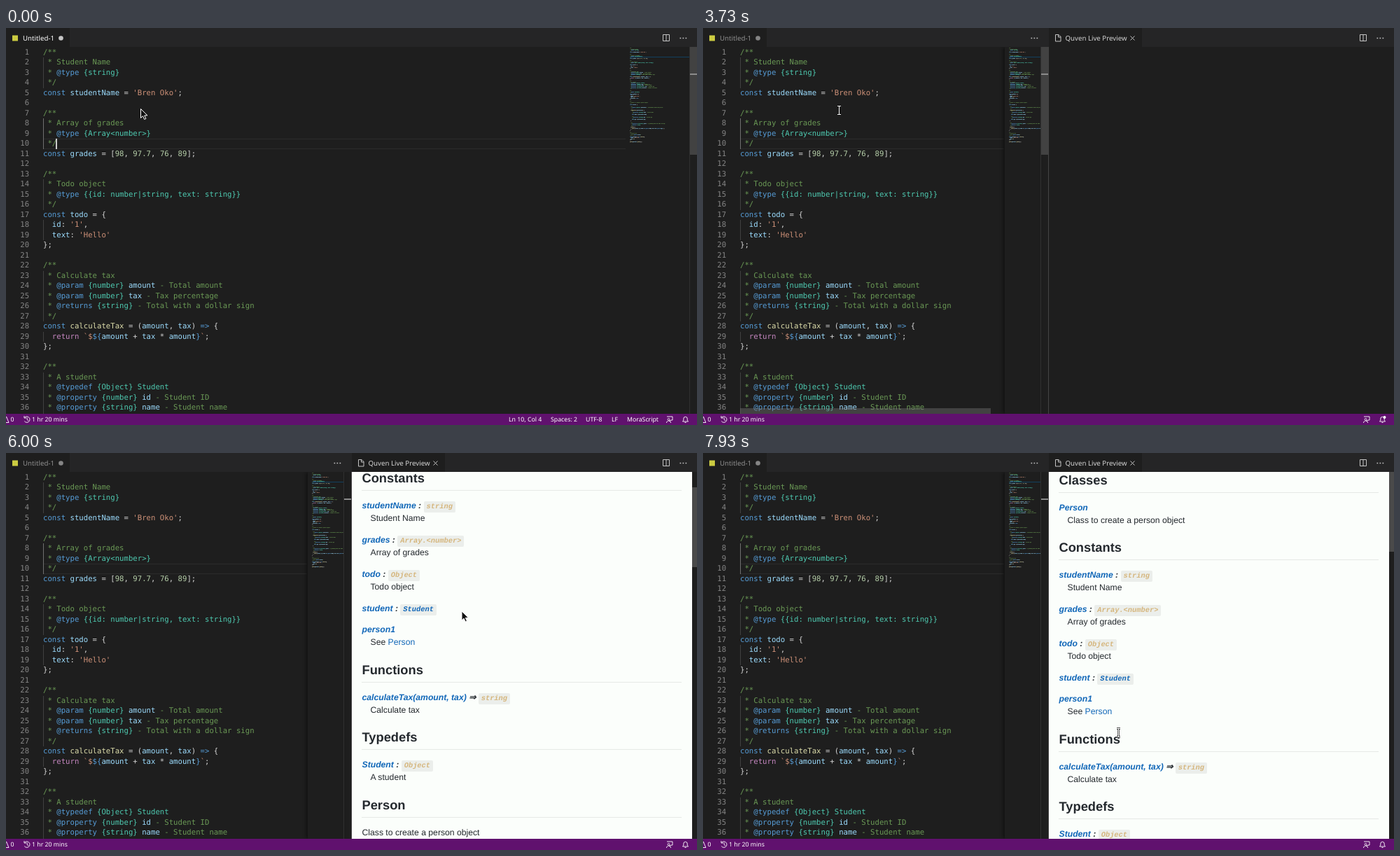
An HTML page that plays this animation: 987 px wide and 567 px high, repeating every 8 s.

```html
<!DOCTYPE html>
<html lang="en">
<head>
<meta charset="utf-8">
<title>Editor with live preview</title>
<style>
html, body { margin: 0; width: 100%; height: 100%; overflow: hidden; background: #1e1e1e; }
body { position: relative; font: 9.68px "Noto Sans", sans-serif; color: #d4d4d4; text-rendering: geometricPrecision; }
body * { position: absolute; }
span, a, b, i, code { position: static !important; }
.t { white-space: pre; line-height: 18px; }
.bar { left: 0; width: 987px; }
#tabs { top: 0; height: 27px; background: #252526; }
.tab { top: 0; height: 27px; background: #1e1e1e; }
.title { color: #fff; }
#status { top: 551px; height: 16px; background: #60116e; color: #fff; font-size: 8.75px; }
#editor { top: 27px; left: 0; width: 987px; height: 524px; overflow: hidden; background: #1e1e1e; }
pre { margin: 0; top: .5px; font: 10.67px/14.5px "DejaVu Sans Mono", monospace; color: #d4d4d4; }
pre div { position: relative; height: 14.5px; }
#code { left: 53px; counter-reset: n; }
#code div::before { counter-increment: n; content: counter(n); position: absolute; right: 100%; margin-right: 19.8px; color: #858585; }
#code .in { box-shadow: inset 1px 0 #404040; }
#code .on { box-shadow: inset 1px 0 #707070; }
#line { left: 53px; top: 131px; width: 832px; height: 13px; border: solid #2c2c2c; border-width: 1px 0; }
#caret { left: 71px; top: 131px; width: 1.5px; height: 15px; background: #ccc; }
#map { left: 885px; top: 0; width: 91px; height: 524px; overflow: hidden; background: #1e1e1e; }
#map pre { left: 6px; transform: scale(.1186, .1052); transform-origin: 0 0; font-weight: bold; -webkit-text-stroke: .8px; }
#map p { margin: 0; left: 6px; top: 14px; width: 90px; height: 1px; background: #12405f; }
#ruler { left: 976px; top: 0; width: 10px; height: 524px; border-left: 1px solid #303030; }
#mark { top: 38px; width: 11px; height: 1.5px; background: #8c8c8c; }
.slider { background: rgba(121, 121, 121, .4); }
#ruler .slider { top: 0; width: 11px; height: 154px; }
#across { left: 53px; top: 516px; width: 358px; height: 8px; }
.split #editor { width: 493px; }
.split #line { width: 377px; }
.split #map { left: 431px; width: 52px; box-shadow: -3px 0 4px -1px #111; }
.split #ruler { left: 482px; }
body:not(.split) .two, .split .one { display: none; }
.split .title { color: #909090; }
#view { left: 493px; top: 27px; width: 494px; height: 524px; overflow: hidden; border-left: 1px solid #444; box-sizing: border-box; background: #1e1e1e; }
#paper { left: 0; top: 0; width: 486px; height: 524px; overflow: hidden; background: #fbfefb; }
#thumb { left: 486px; top: 0; width: 8px; height: 114px; background: #4a4a4a; }
#page { left: -494px; top: -27px; font: 12.19px "Liberation Sans", Arial, sans-serif; color: #24292e; }
#page a { color: #1167b8; }
.h { font-size: 18.29px; font-weight: bold; }
.rule { left: 508px; width: 457px; height: 1px; background: #e6e9e6; }
.d { font-weight: bold; font-style: italic; }
code { font: italic bold 10.36px "Liberation Mono", monospace; padding: 2px 4px; border-radius: 2px; background: #ebeeeb; color: #d5b67d; }
#palette { left: 247px; top: 3px; width: 457px; height: 232px; background: #252526; box-shadow: 0 4px 6px #000; }
#input { left: 3px; top: 3px; width: 447px; height: 16px; background: #3c3c3c; border: 1px solid #2f6072; }
#pick { left: 0; top: 25.6px; width: 457px; height: 16.8px; background: #062f4a; }
#palCaret { left: 12px; top: 6px; width: 1px; height: 11px; background: #ddd; }
#palBar { left: 449px; top: 26px; width: 8px; height: 17px; }
svg { left: 0; top: 0; width: 987px; height: 567px; fill: none; stroke: #c5c5c5; }
.k { color: #569cd6; } .c { color: #c586c0; } .s { color: #ce9178; } .n { color: #b5cea8; }
.v { color: #9cdcfe; } .y { color: #4ec9b0; } .g { color: #6a9955; } .f { color: #dcdcaa; }
</style>
</head>
<body>
<div id="editor">
<div id="line"></div>
<pre id="code">/**
 * Student Name
 * @type {string}
 */
const studentName = 'Bren Oko';

/**
 * Array of grades
 * @type {Array&lt;number>}
 */
const grades = [98, 97.7, 76, 89];

/**
 * Todo object
 * @type {{id: number|string, text: string}}
 */
const todo = {
  id: '1',
  text: 'Hello'
};

/**
 * Calculate tax
 * @param {number} amount - Total amount
 * @param {number} tax - Tax percentage
 * @returns {string} - Total with a dollar sign
 */
const calculateTax = (amount, tax) => {
  return `$${amount + tax * amount}`;
};

/**
 * A student
 * @typedef {Object} Student
 * @property {number} id - Student ID
 * @property {string} name - Student name
 * @property {string|number} age - Student age
 * @property {boolean} isActive - Student is active
 */

/**
 * @type {Student}
 */
const student = {
  id: 1,
  name: 'Bren Oko',
  age: 20,
  isActive: true
};

/**
 * Class to create a person object
 */
class Person {

  /**
   * @param {Object} personInfo - Information about the person
   */
  constructor(personInfo) {
    /**
     * @property {string} name - Person name
     */
    this.name = personInfo.name;

    /**
     * @property {string} age - Person age
     */
    this.age = personInfo.age;
  }

  /**
   * @property {Function} greet - A greeting with the name and age
   * @returns {void}
   */
  greet() {
    print(`Hello, my name is ${this.name} and I am ${this.age}`);
  }
}

/**
 * Person one
 * See {@link Person}
 */
const person1 = new Person({
  name: 'Bren Oko',
  age: 30
});

print(person1.greet());</pre>
<div id="caret"></div>
<div id="map"><p></p><pre></pre></div>
<div id="ruler"><div class="slider fade"></div><div id="mark"></div></div>
<div id="across" class="slider fade two"></div>
</div>
<div id="tabs" class="bar">
<div class="tab" style="left:0;width:91px"></div>
<div class="tab two" style="left:494px;width:133px"></div>
</div>
<div id="status" class="bar"></div>
<div id="view" class="two"><div id="paper"><div id="page"></div></div><div id="thumb"></div></div>
<svg>
<rect x="9" y="10.5" width="8" height="8" fill="#cbcb41" stroke="none"/>
<circle class="one" cx="78.5" cy="14.5" r="3.3" fill="#c5c5c5" stroke="none"/>
<circle class="two" cx="78.5" cy="14.5" r="3.3" fill="#858585" stroke="none"/>
<path d="M938.5 9.5h9v9h-9zM943 9.5v9"/>
<path d="M962.5 14.5h10" stroke-width="1.6" stroke-dasharray="1.7 2.3"/>
<g class="two">
<path d="M468.5 14.5h10" stroke-width="1.6" stroke-dasharray="1.7 2.3"/>
<path d="M503.5 9.5h4.5l3 3v6.5h-7.5zM507.5 9.5v3.5h3.5M610.5 11.5l6 6m0-6l-6 6"/>
</g>
<g stroke="#fff" stroke-width=".9">
<path d="M-4 563.5L.5 555 4 563.5z"/>
<path d="M26.5 556.5a4.2 4.2 0 1 1-.2 5M26 554v3h3M30.2 556.5v3l2 1.3"/>
<path d="M944 555h8v5h-2l-2 2v-2M946.5 557.5a1.4 1.4 0 1 0 .1 0M943.5 564c0-4 6-4 6 0"/>
<path d="M966.5 562h8l-1.3-1.8v-2.2a2.7 2.7 0 0 0-5.4 0v2.2zM969.5 563.5h2"/>
<circle id="dot" cx="973.5" cy="556" r="2" fill="#fff" stroke="none"/>
</g>
</svg>
<div id="palette">
<div id="input"></div><div id="pick"></div><div id="palCaret"></div><div id="palBar" class="slider"></div>
</div>
<svg><g id="mouse">
<path id="arrow" d="M0 0V13l3-2.8 2.2 4.8 2.2-1-2.1-4.6h4.2z" fill="#111" stroke="#fff"/>
<g id="beam" transform="translate(-.5 -.5)">
<path d="M-2.5-6H2.5M0-6V6M-2.5 6H2.5" stroke="#111" stroke-width="2.4"/>
<path d="M-2.5-6H2.5M0-6V6M-2.5 6H2.5" stroke="#fff"/>
</g>
</g></svg>
<script>
const $ = id => document.getElementById(id);
const span = (cls, text) => text ? `<span class="${cls}">${text}</span>` : '';

// Syntax colours
const tokens = /('[^']*'|`\$?)|(\b(?:const|class|new|this|true)\b|=>|\$\{|\}(?=`))|(\breturn\b)|(\b[\d.]+\b)|(\w+(?=\(| = \())|(\w+)/g;
const paint = line => {
  line = line.replace(/</g, '&lt;');
  if (/^\s*(\/\*|\*)/.test(line)) {
    return span('g', line.replace(/(@\w+)( \{.*\})?( \w+)?/, (m, tag, type, name) =>
      span('k', tag) + span('y', type) + span(tag === '@typedef' ? 'y' : 'v', name)));
  }
  return line.replace(tokens, (m, ...groups) => span('skcnfv'[groups.findIndex(Boolean)], m));
};
const source = $('code').textContent.split('\n');
$('code').innerHTML = source.map((line, i) => {
  const guide = line[0] !== ' ' ? '' : i > 6 && i < 10 ? 'on' : 'in';
  return `<div class="${guide}">${paint(line)}</div>`;
}).join('');
document.querySelector('#map pre').innerHTML = source.map(line => `<div>${paint(line)}</div>`).join('');

// Text placed by its left edge and vertical middle
const put = (parent, x, y, html, cls = '') => $(parent).insertAdjacentHTML('beforeend',
  `<div class="t ${cls}" style="left:${x}px;top:${y - 9}px">${html}</div>`);

put('tabs', 24, 14.5, 'Untitled-1', 'title');
put('tabs', 517.5, 14.5, 'Quven Live Preview', 'two');
put('status', 6.5, 8, '0');
put('status', 37, 8, '1 hr 20 mins');
[[718, 'Ln 10, Col 4'], [778, 'Spaces: 2'], [828, 'UTF-8'], [865, 'LF'], [887, 'MoraScript']]
  .forEach(([x, text]) => put('status', x, 8, text, 'one'));

put('palette', 7.5, 11.5, '&gt;');
['Quven: Show Preview', 'Developer: Open Webview Developer Tools', 'Trobeln: (Re)Generate quvens for this project',
  'Trobeln: Display quvens', 'Generate .revignore File', 'Rev: Initialize Repository',
  'Vandok: Fix all auto-fixable Problems', 'Pormiz: Open Database', 'Zu: Install/Update Tools',
  'Zelobrun: Api Key', 'Zelobrun: Open Config File...', 'Zelobrun: Debug'
].forEach((text, i) => put('palette', 7, 34 + i * 16.78, text));
put('palette', 382, 34, '<span style="color:#3c84d8">recently used</span>');

const heading = (y, text) => {
  put('page', 508.5, y, text, 'h');
  $('page').insertAdjacentHTML('beforeend', `<div class="rule" style="top:${y + 17}px"></div>`);
};
const entry = (y, name, type, note, sign = ':') => {
  put('page', 508.5, y, `<a>${name}</a>${type ? ` ${sign} <code>${type}</code>` : ''}`, 'd');
  if (note) put('page', 520.5, y + 18.3, note);
};
heading(39, 'Classes');
entry(77.5, 'Person', '', 'Class to create a person object');
heading(135, 'Constants');
entry(174, 'studentName', 'string', 'Student Name');
entry(223, 'grades', 'Array.&lt;number&gt;', 'Array of grades');
entry(271.8, 'todo', 'Object', 'Todo object');
entry(320.7, 'student', '<a>Student</a>');
entry(351, 'person1', '', 'See <a>Person</a>');
heading(408.5, 'Functions');
entry(448, 'calculateTax(amount, tax)', 'string', 'Calculate tax', '⇒');
heading(505.3, 'Typedefs');
entry(544, 'Student', 'Object', 'A student');
heading(601.5, 'Person');
put('page', 508.5, 640.5, 'Class to create a person object');
put('page', 508.5, 671, '<b>Kind</b>: global class');
put('page', 533, 701.5, '<a>Person</a>');
['new Person(personInfo)', '.name', '.age'].forEach((text, i) => put('page', 557.5, 719.5 + i * 21.5, `<a>${text}</a>`));
const bullet = (x, y, fill) => $('page').insertAdjacentHTML('beforeend',
  `<div style="left:${x}px;top:${y}px;width:3px;height:3px;border:1px solid #24292e;border-radius:50%;background:${fill}"></div>`);
bullet(520, 699, '#24292e');
[0, 1, 2].forEach(i => bullet(544.5, 717.5 + i * 21.5, 'none'));

// Linear track through [time, ...values]
const track = (t, keys) => {
  const next = keys.findIndex(key => key[0] > t);
  if (next < 1) return keys.at(next).slice(1);
  const a = keys[next - 1], b = keys[next], f = (t - a[0]) / (b[0] - a[0]);
  return a.slice(1).map((value, i) => value + (b[i + 1] - value) * f);
};
const scrollKeys = [[5740, 0], [6330, 221.5], [6410, 221.5], [6470, 184], [6605, 184], [6800, 0]];
const mouseKeys = [[5005, 195, 118], [5200, 330, 150], [5400, 590, 212], [5530, 651, 226], [7405, 651, 226],
  [7730, 566, 323], [7805, 566, 323], [7870, 601, 370], [7930, 594, 400]];
const show = (id, on) => { $(id).style.visibility = on ? 'visible' : 'hidden'; };
const between = (t, a, b) => t >= a && t < b;
const fadeOut = (t, start) => Math.min(1, Math.max(0, 1 - (t - start) / 800));

function draw() {
  const t = Math.floor((performance.now() % 8000 + 4) * .015) / .015 + 4;
  document.body.classList.toggle('split', t >= 3600);
  show('caret', t < 330 || between(t, 870, 1400));
  show('palette', between(t, 1400, 3530));
  show('palCaret', between(t, 1400, 2130) || between(t, 2670, 3200));
  $('palBar').style.opacity = t < 1470 ? 0 : fadeOut(t, 1930);
  document.querySelectorAll('.fade').forEach(el => { el.style.opacity = fadeOut(t, 4930); });
  show('dot', between(t, 3670, 4330));
  show('paper', t >= 4000);
  show('thumb', t >= 4000);

  const [scroll] = track(t, scrollKeys);
  $('page').style.transform = `translateY(${-scroll}px)`;
  $('thumb').style.top = scroll * .218 + 'px';

  const [x, y] = t < 70 ? [192.5, 115.5] : track(t, mouseKeys);
  const arrow = t < 70 || x > 430 && t < 7930;
  show('arrow', arrow);
  show('beam', !arrow);
  $('mouse').setAttribute('transform', `translate(${x} ${y})`);
  requestAnimationFrame(draw);
}
draw();
</script>
</body>
</html>
```
